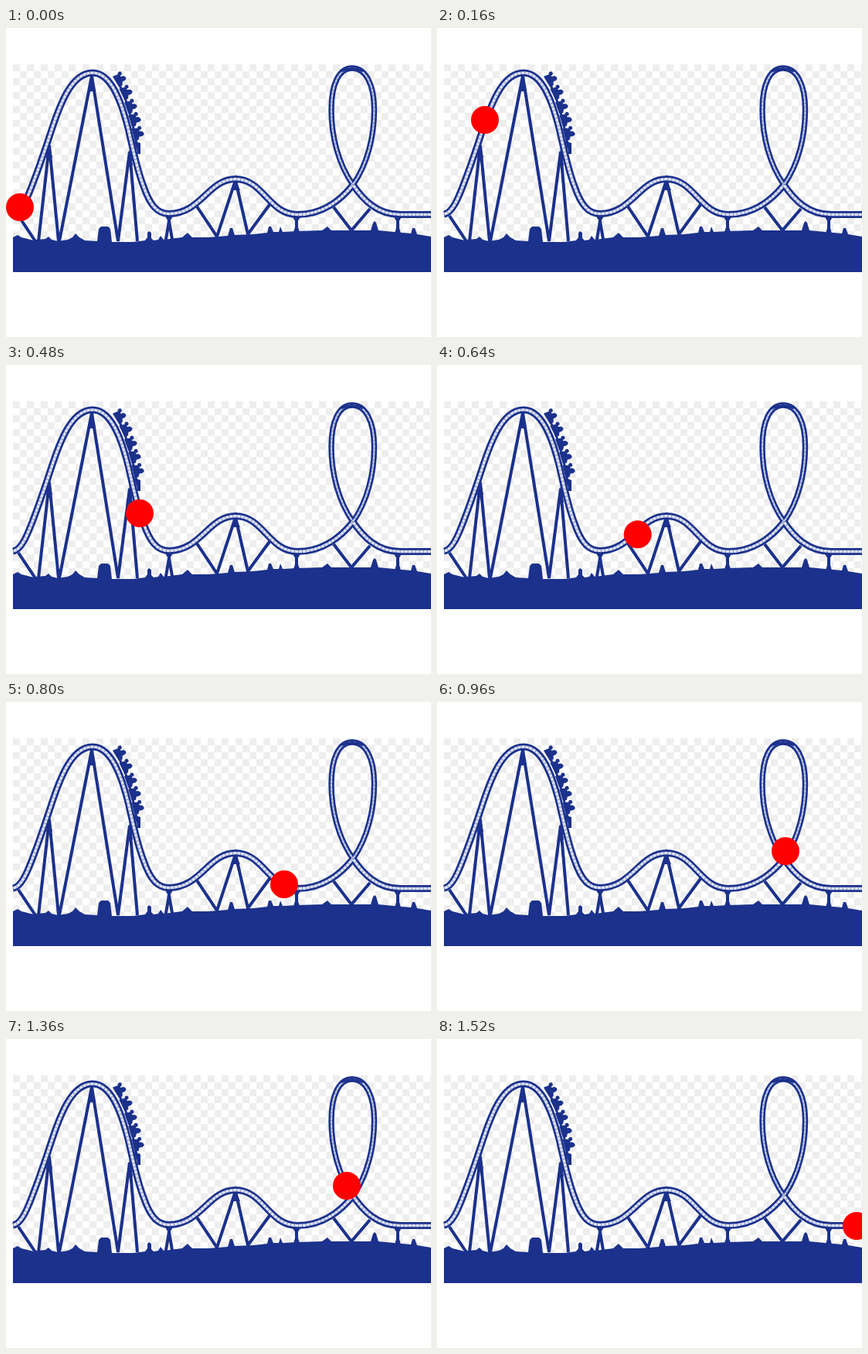
These frames come from a looping animation (550x400 px, 1.6 s). An HTML page without scripts:

```html
<!DOCTYPE html>
<html lang="en">
<head>
<meta charset="utf-8">
<title>Roller coaster</title>
<style>
  html, body { margin: 0; width: 100%; height: 100%; overflow: hidden; background: #fff; }
  svg { display: block; width: 550px; height: 400px; }
  .navy { fill: #1b318c; }
  .rail, .supports, .ties, .coupling { fill: none; stroke: #1b318c; }
  .rail { stroke-width: 9; }
  .gap { fill: none; stroke: #dde2f0; stroke-width: 3.6; }
  .ties { stroke-width: 3.6; stroke-dasharray: 1 4; opacity: .45; }
  .loop .rail { stroke-width: 7.4; }
  .loop .gap { stroke-width: 2.2; stroke: #c5cde5; }
  .loop .ties { stroke-width: 2.2; }
  .supports { stroke-width: 4; }
  .coupling { stroke-width: 3; }
  .ball { fill: #f00; }
</style>
</head>
<body>
<svg viewBox="0 0 550 400">
  <defs>
    <pattern id="checker" x="9" y="47" width="18" height="18" patternUnits="userSpaceOnUse">
      <path d="M0 0H9V18H18V9H0Z" fill="#eee"/>
    </pattern>
    <path id="hills" d="M9 241C16 240 22 232 28 218C40 190 48 165 58 135C70 98 85 58 112 58C137 58 150 98 158 130C165 160 170 185 178 205C186 228 195 240.500 211 240.500C252 240.500 262 195.500 297 195.500C333 195.500 340 241.500 377 241.500C410 241.500 434 222 449 203"/>
    <path id="exit" d="M449 203C462 222 480 241.500 510 241.500H550"/>
    <path id="loop" d="M449 203C468 176 476.500 140 476.500 106C476.500 72 465 52 448 52C431 52 421 72 421 106C421 140 430 176 449 203"/>
    <g id="car" class="navy">
      <path d="M-6-8L4-7L3-3L7-2L6 4L2 4L0 8L-5 8Z"/>
      <circle cx="4" cy="-7" r="2.500"/>
      <circle cx="6" cy="1" r="2.500"/>
    </g>
  </defs>

  <rect x="9" y="47" width="541" height="269" fill="url(#checker)"/>

  <path class="supports" d="M16 243L38 276M42 276L56 152L68 276M69 276L111 62L145 276L160 160L170 276M211 243V254M206.500 276L211 250L215.500 276M247 231L273 270L297 197L313 267L343 226M376 243V263M424 232L447 262L471 234M507 243V265"/>
  <g class="navy">
    <path d="M52 168L56 148L60 168ZM106 82L111 60L116 82ZM156 178L160 156L164 178ZM291 210L297 196L303 210Z"/>
    <path d="M205 242H217L211 252ZM370 243H382L376 253ZM501 243H513L507 253ZM372 264L376 252L380 264ZM503 266L507 252L511 266Z"/>
    <path d="M9 271L15 268L20 271L36 275L40 274L51 273L55 270L59 274L67 276L80 274L86 271L90 266L95 271L102 275L118 276L120 260L123 257H132L135 260L137 277H165L180 275L183 271L183 265L185 263L188 265L188 272L191 275L197 274L200 269L204 274L228 271L235 265L241 271L262 271L287 269L290 259H293L296 268L320 267L338 265L340 257H343L346 264L353 264L355 257L358 264L376 263L409 262L416 257L421 262L447 262L472 262L475 252L477 250L479 252L482 262L502 264L524 266L526 259H529L532 267L550 270V316H9Z"/>
  </g>

  <g class="loop">
    <use href="#loop" class="rail"/>
    <use href="#loop" class="gap"/>
    <use href="#loop" class="ties"/>
    <path d="M434 56Q448 49 462 56" fill="none" stroke="#1b318c" stroke-width="3"/>
  </g>
  <g class="rail"><use href="#hills"/><use href="#exit"/></g>
  <g class="gap"><use href="#hills"/><use href="#exit"/></g>
  <g class="ties"><use href="#hills"/><use href="#exit"/></g>

  <g>
    <path class="coupling" d="M143 66Q160 96 170 156"/>
    <use href="#car" transform="translate(147 67) rotate(-28)"/>
    <use href="#car" transform="translate(155 84) rotate(-22)"/>
    <use href="#car" transform="translate(161 102) rotate(-16)"/>
    <use href="#car" transform="translate(166 119) rotate(-14)"/>
    <use href="#car" transform="translate(170 137) rotate(-10)"/>
    <path class="navy" d="M165 146L174 149V163H170L169 155Z"/>
  </g>

  <!-- The ball advances about 60px along the track every 80ms -->
  <circle class="ball" r="18">
    <animateMotion dur="1.6s" repeatCount="indefinite" calcMode="discrete"
      values="18,232; 43,177; 62,119; 95,67; 143,76; 159,134; 173,192; 206,239; 259.7,219.3; 313,198; 360,236; 416,234; 451,193; 474,134; 470,74; 429.5,73; 421,133; 441,190; 484,236; 543,242"/>
  </circle>
</svg>
</body>
</html>
```
